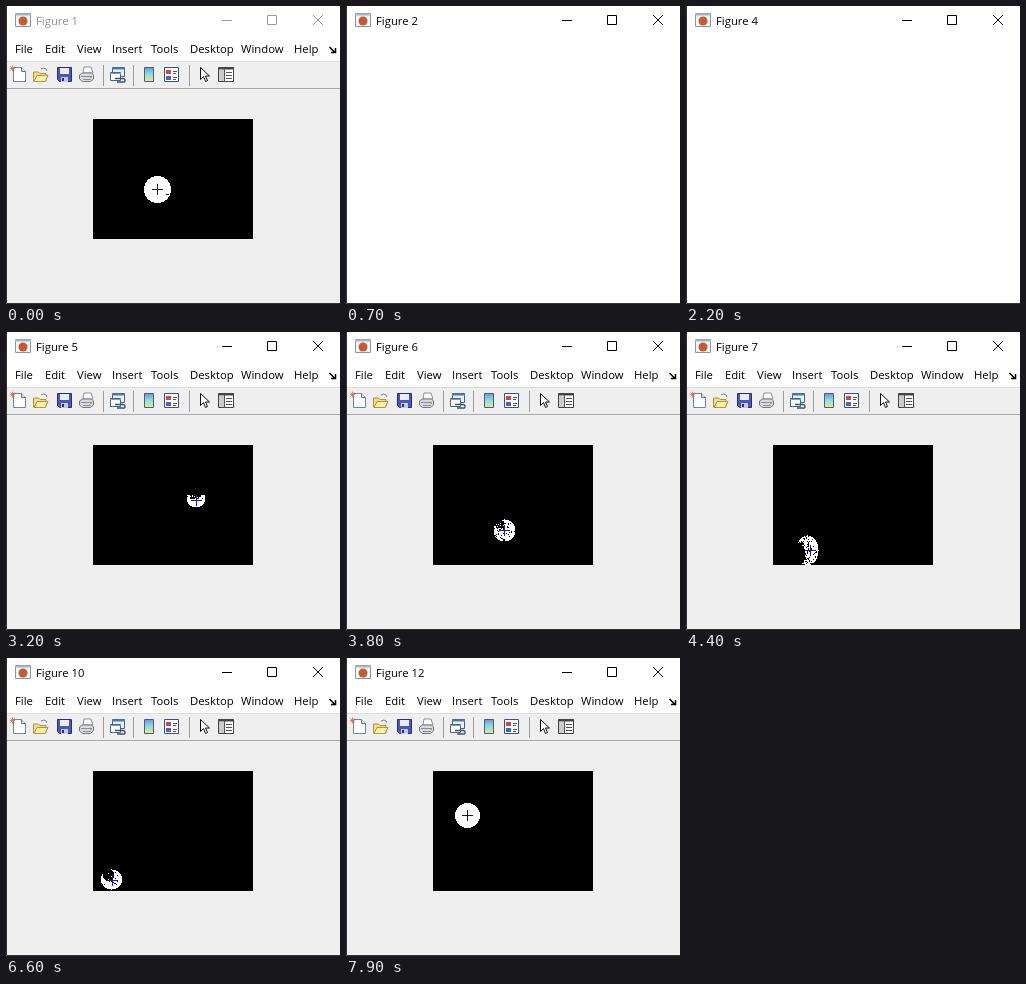
An HTML page for the animation above (8000 ms loop, 334 by 298 pixels).

```html
<!DOCTYPE html>
<html lang="en">
<head>
<meta charset="utf-8">
<title>Figure windows</title>
<style>
html, body { margin: 0; width: 100%; height: 100%; overflow: hidden; background: #fff; }
svg { display: block; width: 100%; height: 100%; }
text { font: 11.3px "Open Sans", "Noto Sans", sans-serif; }
</style>
</head>
<body>
<svg viewBox="0 0 334 298">
  <rect width="334" height="298" fill="#fff"/>

  <g id="chrome">
    <g id="menu" fill="#000"></g>
    <path d="M323.500 41l5 5M325 46.500h4.500v-4.500" fill="none" stroke="#000" stroke-width="1.500"/>
    <rect y="55" width="334" height="243" fill="#efefef"/>
    <path d="M0 55.500H334" stroke="#dcdcdc"/>
    <path d="M0 82.500H334" stroke="#a8a8a8"/>
    <path d="M97.500 59v21M127.500 59v21M183.500 59v21" stroke="#9c9c9c"/>

    <g id="new-doc">
      <path d="M7.500 61.500h8l4 4v10h-12z" fill="#fff" stroke="#6d87a0"/>
      <path d="M15.500 61.500v4h4" fill="#dce8f0" stroke="#587186"/>
      <path d="M4.500 60.500l4 4M8.500 60.500l-4 4M6.500 59.500v6M4 62.500h5" stroke="#dd6a4a" stroke-width=".8"/>
    </g>
    <g id="open">
      <path d="M27.500 75v-9h5l1.500 1.500h6v7.500z" fill="#f5dc7c" stroke="#b0944a"/>
      <path d="M28 75.500l3-6h11l-3 6z" fill="#fff0a8" stroke="#b0944a"/>
      <path d="M35 63q3-2 5 0l1 2" fill="none" stroke="#6d87a0"/>
    </g>
    <g id="save">
      <path d="M51.500 61.500h14v14h-12l-2-2z" fill="#4c55b8" stroke="#272f78"/>
      <path d="M54 62h9v6h-9z" fill="#e8edfb"/>
      <path d="M55 71h7v5h-7z" fill="#c7cad8"/>
      <path d="M56 72h2v3h-2z" fill="#272f78"/>
    </g>
    <g id="print">
      <path d="M77 67l1-6h7l2 6z" fill="#fff" stroke="#8a8f98"/>
      <path d="M73.500 69l3-2h9l2 2v4l-3 2.500h-8l-3-2.500z" fill="#d8dadd" stroke="#74787e"/>
      <path d="M75 70.500h11M77 73.500h8" stroke="#8a8f98"/>
      <path d="M84 71h2v1h-2z" fill="#d9a631"/>
    </g>
    <g id="link">
      <path d="M106.500 61.500h12v9h-12z" fill="#e8f1fa" stroke="#4a6285"/>
      <path d="M106 62.500h13" stroke="#4c78ae" stroke-width="2"/>
      <path d="M104.500 66.500h10v8h-10z" fill="#fff" stroke="#4a6285"/>
      <path d="M104 67.500h11" stroke="#7f9dc2"/>
      <path d="M109 72.500h8q2 0 2 2t-2 1.500h-6" fill="none" stroke="#3d526c" stroke-width="1.300"/>
    </g>
    <g id="colorbar">
      <linearGradient id="bar" x2="0" y2="1">
        <stop stop-color="#7a8fd8"/><stop offset=".45" stop-color="#82dfe2"/><stop offset="1" stop-color="#f3e67c"/>
      </linearGradient>
      <path d="M138.500 61.500h9v14h-9z" fill="url(#bar)" stroke="#4b5b89"/>
    </g>
    <g id="legend">
      <path d="M158.500 61.500h14v14h-14z" fill="#fff" stroke="#3f4e82"/>
      <path d="M160 64h5v4h-5z" fill="#d64545"/>
      <path d="M160 70h5v4h-5z" fill="#4a61cf"/>
      <path d="M167 65.500h4M167 67.500h3M167 71.500h4M167 73.500h3" stroke="#555"/>
    </g>
    <path id="pointer" d="M194.500 61.500v12l3-3 2 5 2-1-2-4.500h4z" fill="#fff" stroke="#111"/>
    <g id="panel">
      <path d="M212.500 61.500h15v14h-15z" fill="#fff" stroke="#444"/>
      <path d="M212 62.500h16" stroke="#444" stroke-width="2"/>
      <path d="M213 64h5v11h-5z" fill="#ccc"/>
      <path d="M218.500 63v12M220 66.500h6M220 69.500h6M220 72.500h6" stroke="#555"/>
    </g>
  </g>

  <g id="image">
    <rect x="87" y="113" width="160" height="120"/>
    <path id="blob" fill="#fff" shape-rendering="crispEdges"/>
    <path id="cross" fill="none"/>
  </g>

  <path d="M9.500 7.500h15v13h-15z" fill="#f4f7fa" stroke="#8496a8"/>
  <path d="M9 8.500h16" stroke="#a3b7ca" stroke-width="2"/>
  <circle cx="17" cy="15" r="4.500" fill="#c65a30"/>
  <text id="title" x="30" y="19"></text>
  <path id="buttons" d="M216 14.500h10M261.500 9.500h9v9h-9zM307 9l10 10M317 9l-10 10" fill="none"/>
  <path d="M.5 0V297.500H334" fill="none" stroke="#343434"/>
</svg>
<script>
const LOOP = 8000;
const $ = id => document.getElementById(id);

// Repeatable noise in 0..1 for a pixel.
const hash = (x, y) => {
  const n = Math.sin(x * 127.1 + y * 311.7) * 43758.5453;
  return n - Math.floor(n);
};
const within = (x, y, cx, cy, r) => Math.hypot(x - cx, y - cy) < r;

// Chance that a pixel of the ball is missing; u and v run from -1 to 1.
const solid = () => 0;
const speckled = (u, v) => within(u, v, -.4, -.5, .45) ? .8 : .1;
const lower = (u, v) => v < -.35 ? 1 : v < .12 ? (u < -.65 || u > .55 ? .1 : .65) : .02;
const crescent = (u, v) => v > .85 ? .1 : within(u, v, -1.05, .3, .85) ? 1 : u < .2 ? .25 : .08;
const notched = (u, v) => within(u, v, -.28, -.42, .56) ? .95 : within(u, v, .3, .2, .35) ? .3 : .03;

const NAVY = '#14143c', BLUE = '#1818b8';
const fig = (start, steps, blank, x, y, rx, ry, hole, color = BLUE, cx = x, cy = y) =>
  ({ start, steps, blank, x, y, rx, ry, hole, color, cx, cy });

const figures = [
  fig(0, 0, false, 151.5, 183.5, 13.5, 13.5, solid, NAVY),
  fig(700, 4, true, 165.5, 177.5, 13, 13, solid, NAVY),
  fig(1400, 3, false, 178.5, 178.5, 12, 12, solid, NAVY),
  fig(2200, 4, true, 187.5, 172.5, 11, 11, speckled),
  fig(2900, 4, true, 190, 166, 9.5, 9.5, lower, BLUE, 190.5, 168.5),
  fig(3700, 3, true, 158.5, 198.5, 11, 11, speckled),
  fig(4300, 3, true, 121.5, 218.5, 11, 15, crescent, BLUE, 124.5, 218.5),
  fig(5000, 3, false, 114.5, 221.5, 10, 11, crescent),
  fig(5700, 3, true, 108.5, 221.5, 10.5, 10.5, speckled),
  fig(6400, 3, false, 105.5, 221.5, 10.5, 10, notched, BLUE, 106.5, 222.5),
  fig(7100, 4, true, 112.5, 190.5, 11.5, 11.5, solid, NAVY),
  fig(7700, 3, false, 121.5, 157.5, 12.5, 12.5, solid, NAVY)
];

function ballPath({ x, y, rx, ry, hole }) {
  let d = '';
  for (let py = Math.floor(y - ry); py < Math.min(233, y + ry); py++) {
    for (let px = Math.floor(x - rx); px < x + rx; px++) {
      const u = (px + .5 - x) / rx, v = (py + .5 - y) / ry;
      if (u * u + v * v <= 1 && hash(px, py) >= hole(u, v)) d += `M${px} ${py}h1v1h-1z`;
    }
  }
  return d;
}

for (const f of figures) f.path = ballPath(f);

const menu = { File: 9, Edit: 39, View: 71, Insert: 106, Tools: 145, Desktop: 184, Window: 235, Help: 288 };
$('menu').innerHTML = Object.entries(menu)
  .map(([label, x]) => `<text x="${x}" y="47">${label}</text>`).join('');

const show = (id, on) => $(id).setAttribute('visibility', on ? 'visible' : 'hidden');
let shown = -1;

function draw(t) {
  const i = figures.findLastIndex(f => f.start <= t);
  const f = figures[i], age = t - f.start, slow = f.steps === 4;

  if (i !== shown) {
    shown = i;
    $('title').textContent = `Figure ${i + 1}`;
    $('title').setAttribute('fill', i ? '#000' : '#8f8f8f');
    $('buttons').setAttribute('stroke', i ? '#000' : '#999');
    $('blob').setAttribute('d', f.path);
    $('cross').setAttribute('d', `M${f.cx - 5.5} ${f.cy}h11M${f.cx} ${f.cy - 5.5}v11` + (i ? '' : 'M160 188.5h3'));
    $('cross').setAttribute('stroke', f.color);
  }
  show('chrome', !f.blank || age >= 100);
  show('image', !f.blank || age >= (slow ? 200 : 100));
  show('cross', !f.steps || age >= (slow ? 300 : 100));
}

function tick() {
  draw(performance.now() % LOOP);
  requestAnimationFrame(tick);
}
tick();
</script>
</body>
</html>
```
